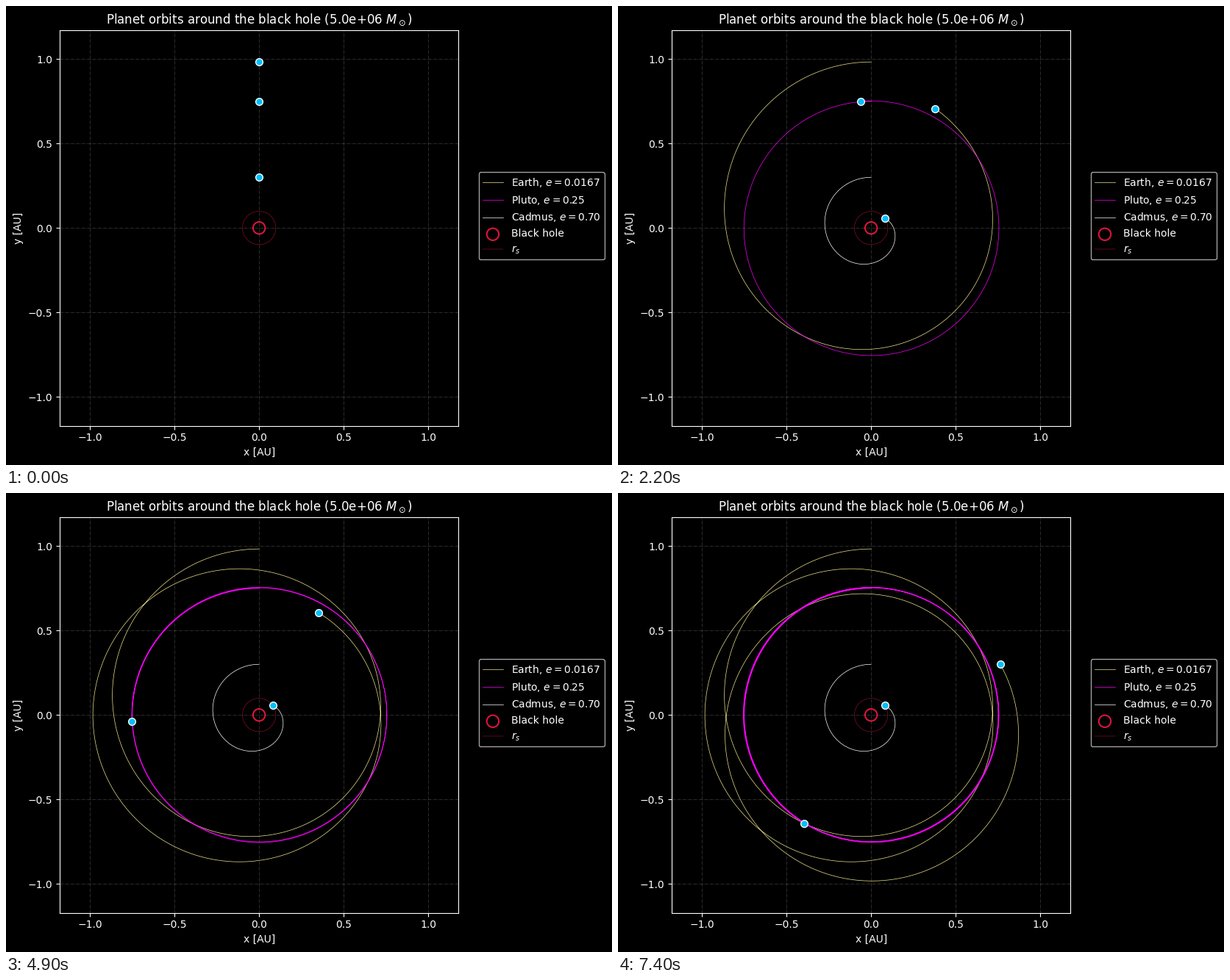
A matplotlib script for the animation above (7500 ms loop, 824 px wide and 625 px high).

```python
import numpy as np
import matplotlib.pyplot as plt
from matplotlib.animation import FuncAnimation

W, H, DPI = 824, 625, 100
AX_W, AX_H, PAD = 542.5, 539, 10
FRAMES, INTERVAL = 75, 100
SUB = 200                      # integration steps per frame

# Units: AU, G*M = 1, so a circular orbit at 1 AU takes 2*pi.
MASS = 5e6
M = MASS * 1.32712e20 / 2.99792458e8**2 / 1.495978707e11
RS = 2 * M
PLANETS = [
    ("Earth", "0.0167", "khaki"),
    ("Pluto", "0.25", "magenta"),
    ("Cadmus", "0.70", "white"),
]


def integrate():
    """RK4 orbits with the relativistic correction; a planet stops at RS."""
    ecc = np.array([float(e) for _, e, _ in PLANETS])
    l2 = 1 - ecc**2
    pos = 1j * (1 - ecc)
    vel = -np.sqrt((1 + ecc) / (1 - ecc)) + 0j
    n = (FRAMES - 1) * SUB
    dt = 4 * np.pi / n

    def acc(z):
        r = np.abs(z)
        return -z / r**3 * (1 + 3 * M * l2 / r**2)

    path = [pos]
    for _ in range(n):
        k1 = acc(pos)
        v2 = vel + k1 * dt / 2
        k2 = acc(pos + vel * dt / 2)
        v3 = vel + k2 * dt / 2
        k3 = acc(pos + v2 * dt / 2)
        v4 = vel + k3 * dt
        k4 = acc(pos + v3 * dt)
        new = pos + dt / 6 * (vel + 2 * v2 + 2 * v3 + v4)
        alive = np.abs(new) > RS
        pos = np.where(alive, new, pos)
        vel = np.where(alive, vel + dt / 6 * (k1 + 2 * k2 + 2 * k3 + k4), vel)
        path.append(pos)
    return np.array(path).T


def trim(path):
    """Drop the repeated points after a planet has stopped."""
    moving = np.flatnonzero(np.diff(path))
    return path[:moving[-1] + 2]


def place(left, bottom):
    ax.set_position([left / W, bottom / H, AX_W / W, AX_H / H])


orbits = [trim(p) for p in integrate()]

plt.style.use("dark_background")
fig = plt.figure(figsize=(W / DPI, H / DPI), dpi=DPI)
ax = fig.add_axes([0.1, 0.1, 0.6, 0.8])
place(0, 0)
reach = 1.2 * abs(orbits[0][0])
ax.set_xlim(-reach, reach)
ax.set_ylim(-reach * AX_H / AX_W, reach * AX_H / AX_W)
ticks = np.arange(-1, 1.1, 0.5)
ax.set_xticks(ticks)
ax.set_yticks(ticks)
ax.grid(ls="-.", lw=0.5, color="white", alpha=0.25)
ax.set_xlabel("x [AU]")
ax.set_ylabel("y [AU]")
ax.set_title(rf"Planet orbits around the black hole ({MASS:.1e} $M_\odot$)")

# Shift the axes so that the outer labels keep an even margin.
tight = fig.get_tightbbox()
place(PAD - tight.x0 * DPI, PAD - tight.y0 * DPI)

trails = [ax.plot([], [], lw=0.5, color=color, label=f"{name}, $e={e}$")[0]
          for name, e, color in PLANETS]
hole = ax.scatter(0, 0, s=140, facecolors="none", edgecolors="crimson",
                  linewidths=1.5, label="Black hole")
theta = np.linspace(0, 2 * np.pi, 200)
horizon, = ax.plot(RS * np.cos(theta), RS * np.sin(theta), lw=0.3,
                   color="crimson", label="$r_s$")
dots = [ax.plot([], [], "o", ms=7, mew=1, mfc="deepskyblue", mec="white",
                zorder=5)[0] for _ in PLANETS]
ax.legend(handles=trails + [hole, horizon], loc=(1.05, 0.42))


def update(frame):
    for orbit, trail, dot in zip(orbits, trails, dots):
        done = orbit[:frame * SUB + 1]
        trail.set_data(done.real, done.imag)
        dot.set_data([done[-1].real], [done[-1].imag])
    return trails + dots


anim = FuncAnimation(fig, update, frames=FRAMES, interval=INTERVAL,
                     init_func=lambda: update(0), repeat=True, repeat_delay=0)
plt.show()
```
